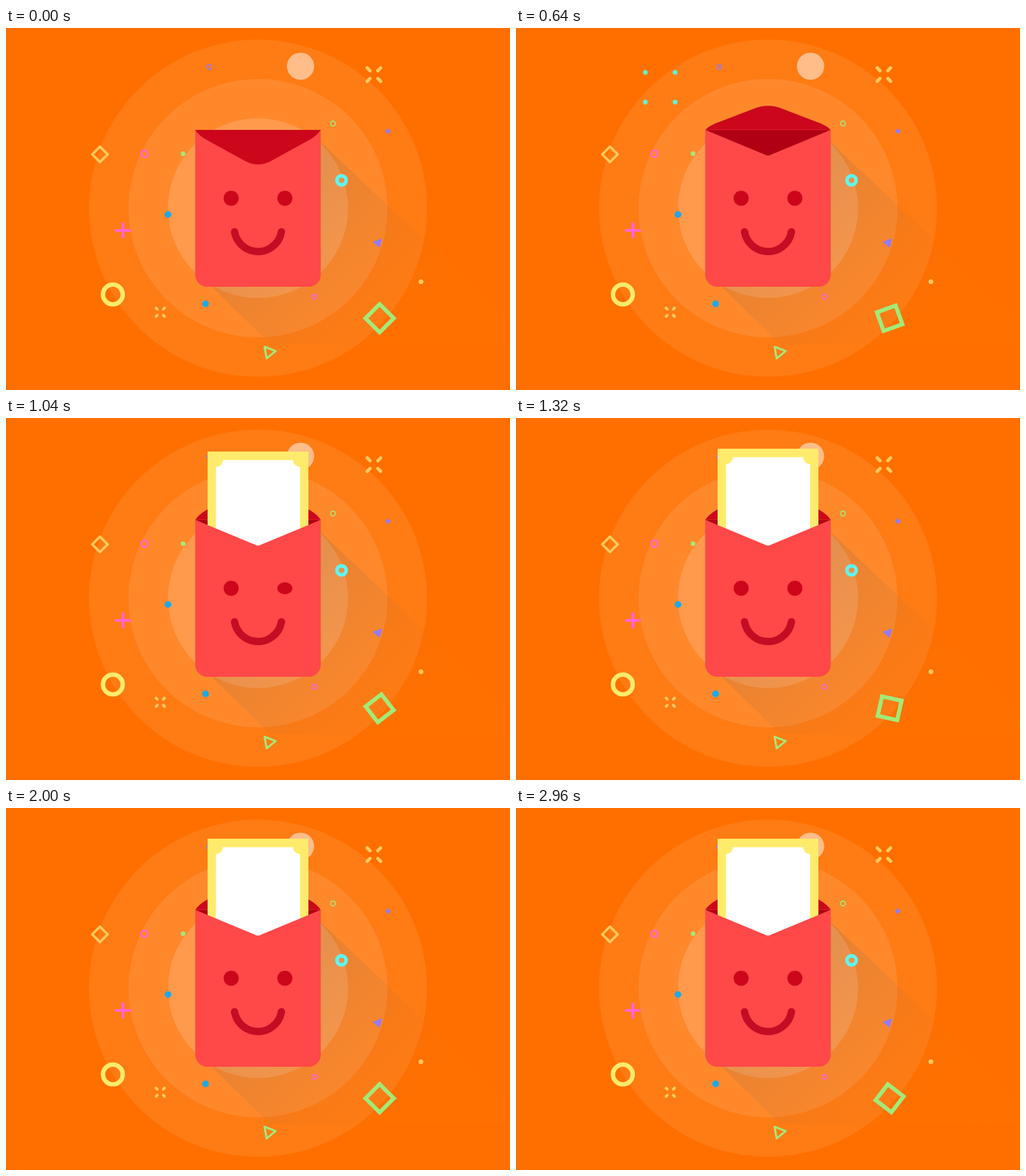
Animation, 750 px wide and 540 px high, one loop 3 s. Source, as an HTML page with a canvas:

```html
<!DOCTYPE html>
<html lang="en">
<head>
<meta charset="utf-8">
<title>Smiling envelope</title>
<style>
html, body { margin: 0; width: 100%; height: 100%; overflow: hidden; background: #ff6f00; }
canvas { display: block; }
</style>
</head>
<body>
<canvas id="stage" width="750" height="540"></canvas>
<script>
const ctx = document.getElementById('stage').getContext('2d');
const LOOP = 3000, STEP = 40;
const AMBER = '#ffc95c', LEMON = '#ffeb6b', GREEN = '#a2ea78', PINK = '#ff66d0',
      VIOLET = '#917bff', BLUE = '#1caae8', AQUA = '#5cf6f0', RED = '#ff4848',
      DARK = '#cc071c', INSIDE = '#b00014';

const clamp = p => Math.max(0, Math.min(1, p));
const span = (t, a, b) => clamp((t - a) / (b - a));
const easeInOut = p => p < 0.5 ? 4 * p ** 3 : 1 - 4 * (1 - p) ** 3;
const easeOut = p => 1 - (1 - p) ** 3;

function dot(x, y, r, color) {
  ctx.fillStyle = color;
  ctx.beginPath();
  ctx.arc(x, y, r, 0, Math.PI * 2);
  ctx.fill();
}

function ring(x, y, r, width, color) {
  ctx.strokeStyle = color;
  ctx.lineWidth = width;
  ctx.beginPath();
  ctx.arc(x, y, r, 0, Math.PI * 2);
  ctx.stroke();
}

function poly(points) {
  ctx.beginPath();
  points.forEach(([x, y]) => ctx.lineTo(x, y));
  ctx.closePath();
}

function fillPoly(points, color) {
  poly(points);
  ctx.fillStyle = color;
  ctx.fill();
}

function strokePoly(points, width, color, join) {
  poly(points);
  ctx.lineJoin = join;
  ctx.lineWidth = width;
  ctx.strokeStyle = color;
  ctx.stroke();
}

function line(x1, y1, x2, y2, width, color, cap) {
  ctx.strokeStyle = color;
  ctx.lineWidth = width;
  ctx.lineCap = cap;
  ctx.beginPath();
  ctx.moveTo(x1, y1);
  ctx.lineTo(x2, y2);
  ctx.stroke();
}

const diamond = (x, y, r) => [[x, y - r], [x + r, y], [x, y + r], [x - r, y]];

function sparkle(x, y, inner, outer, width) {
  for (const sx of [-1, 1]) for (const sy of [-1, 1])
    line(x + sx * inner, y + sy * inner, x + sx * outer, y + sy * outer, width, AMBER, 'round');
}

function backdrop() {
  ctx.fillStyle = '#ff6f00';
  ctx.fillRect(0, 0, 750, 540);
  dot(375, 268.8, 251.5, '#ff7b14');
  dot(375, 268.8, 192.7, '#ff882b');
  dot(375, 268.8, 134, '#ff9a4d');

  const shade = ctx.createLinearGradient(375, 300, 560, 485);
  shade.addColorStop(0, 'rgba(130,105,80,0.2)');
  shade.addColorStop(0.45, 'rgba(150,110,70,0.11)');
  shade.addColorStop(1, 'rgba(255,130,20,0.04)');
  fillPoly([[468, 170], [750, 438], [750, 472], [394, 472], [304, 384]], shade);
}

function confetti(t) {
  dot(438.3, 57, 20.3, 'rgba(255,255,255,0.5)');
  ring(302.5, 58, 3.5, 1.6, VIOLET);
  ring(486.5, 142.4, 3.5, 1.6, GREEN);
  ring(206, 187.5, 5, 2.5, PINK);
  ring(459, 401, 3.5, 1.9, PINK);
  ring(499.3, 227.3, 6.8, 5.4, AQUA);
  ring(159, 397.5, 14.7, 6.6, LEMON);
  dot(263.5, 187.5, 3.4, GREEN);
  dot(241, 278.2, 5, BLUE);
  dot(297, 411.5, 5, BLUE);
  dot(617.5, 378.5, 3.5, AMBER);
  sparkle(547.5, 69.5, 5.8, 10, 5);
  sparkle(229.6, 424, 4.5, 6.3, 4.2);
  line(162.3, 302, 185.7, 302, 4, PINK, 'butt');
  line(174, 290.3, 174, 313.7, 4, PINK, 'butt');
  fillPoly(diamond(568.3, 154, 4.2), VIOLET);
  fillPoly([[545.5, 319], [559.5, 314], [556, 327.5]], VIOLET);
  strokePoly(diamond(139.8, 188.5, 11.5), 3.8, AMBER, 'round');
  strokePoly([[384.8, 475.5], [401.3, 481.8], [387.8, 492.8]], 3, GREEN, 'round');

  // half a turn per second
  ctx.save();
  ctx.translate(556, 433);
  ctx.rotate(Math.PI * t / 1000);
  strokePoly(diamond(0, 0, 21), 6, GREEN, 'miter');
  ctx.restore();
}

function burst(t) {
  if (t < 240 || t >= 720) return;
  const r = 31.3 * easeOut(span(t, 200, 480));
  for (let i = 0; i < 8; i++) {
    if (i % 2 === 0 && t >= 560) continue;
    const a = i * Math.PI / 4;
    const x = 214.6 + r * Math.cos(a), y = 88.3 + r * Math.sin(a);
    dot(x, y, 4.2, 'rgba(150,200,110,0.55)');
    dot(x, y, 3.2, '#5cf6dc');
  }
}

function flap(scale) {
  ctx.save();
  ctx.translate(375, 152);
  ctx.scale(1, scale);
  ctx.fillStyle = DARK;
  ctx.beginPath();
  ctx.moveTo(-93.5, 0);
  ctx.quadraticCurveTo(-88, 8, -78, 14);
  ctx.lineTo(-20, 46);
  ctx.quadraticCurveTo(0, 57, 20, 46);
  ctx.lineTo(78, 14);
  ctx.quadraticCurveTo(88, 8, 93.5, 0);
  ctx.closePath();
  ctx.fill();
  ctx.restore();
}

function card(y) {
  ctx.fillStyle = LEMON;
  ctx.fillRect(300, y, 150, 180);
  ctx.fillStyle = '#fff';
  ctx.fillRect(312.5, y + 12.7, 125, 160);
  ctx.save();
  ctx.beginPath();
  ctx.rect(300, y, 150, 180);
  ctx.clip();
  dot(312.5, y + 12.7, 10.3, LEMON);
  dot(437.5, y + 12.7, 10.3, LEMON);
  ctx.restore();
}

function pocket() {
  ctx.fillStyle = RED;
  ctx.beginPath();
  ctx.moveTo(281.6, 152);
  ctx.lineTo(370, 188.8);
  ctx.quadraticCurveTo(375, 191.8, 380, 188.8);
  ctx.lineTo(468.4, 152);
  ctx.arcTo(468.4, 386, 375, 386, 18);
  ctx.arcTo(281.6, 386, 281.6, 152, 18);
  ctx.closePath();
  ctx.fill();
}

function eye(x, t, start) {
  const wink = Math.sin(Math.PI * span(t, start, start + 240)) ** 2;
  ctx.fillStyle = DARK;
  ctx.beginPath();
  ctx.ellipse(x, 254, 11.2, 11.2 * (1 - 0.8 * wink), 0, 0, Math.PI * 2);
  ctx.fill();
}

function face(t) {
  eye(415, t, 1000);
  eye(335, t, 2000);
  ctx.strokeStyle = '#c40d24';
  ctx.lineWidth = 11;
  ctx.lineCap = 'round';
  ctx.beginPath();
  ctx.arc(375, 298, 35.4, 0.17, Math.PI - 0.17);
  ctx.stroke();
}

function envelope(t) {
  const fold = Math.cos(Math.PI * span(t, 170, 800));
  if (fold < 0) flap(fold);
  fillPoly([[281.6, 152], [468.4, 152], [375, 193]], INSIDE);
  if (fold < 0) line(282, 151.8, 468, 151.8, 1, 'rgba(235,60,60,0.55)', 'butt');
  if (t > 700) card(200 - 154.2 * easeInOut(span(t, 700, 1120)));
  pocket();
  if (fold >= 0) flap(fold);
  face(t);
}

function draw(t) {
  backdrop();
  confetti(t);
  burst(t);
  envelope(t);
}

const begin = performance.now();
function tick() {
  const t = (performance.now() - begin) % LOOP;
  draw(Math.floor(t / STEP) * STEP);
  requestAnimationFrame(tick);
}
tick();
</script>
</body>
</html>
```
